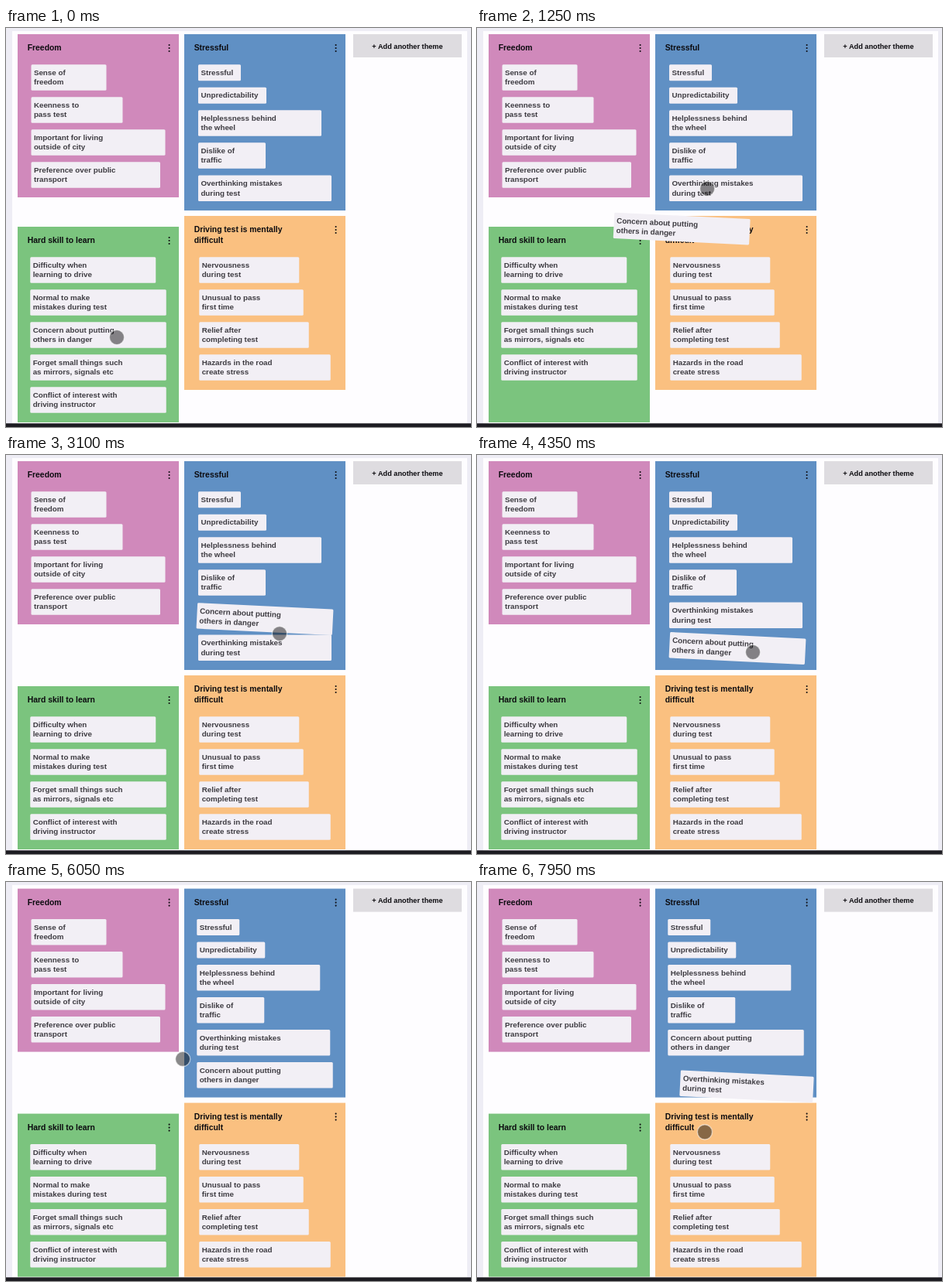
Animation, 600 px wide and 516 px high, one loop 8 s. Source, as an HTML page:

```html
<!DOCTYPE html>
<html lang="en">
<head>
<meta charset="utf-8">
<title>Theme board</title>
<style>
  html, body { margin: 0; width: 100%; height: 100%; overflow: hidden; background: #fefdff; }
  svg { display: block; width: 600px; height: 516px; }
  text { font: bold 9.8px "Liberation Sans", Arial, sans-serif; fill: #3e3c42; }
  .title { font-size: 10.4px; fill: #0c0b0f; }
  .button { font-size: 9.2px; fill: #0c0b0f; text-anchor: middle; }
</style>
</head>
<body>
<svg viewBox="0 0 600 516"></svg>
<script>
const LOOP = 8000;
const SLOT = 42;          // height of a two-line card plus its gap
const LAG = 100;          // dragged cards trail the pointer
const TILT = 2.8;
const CARD_H = 33.5;

const svg = document.querySelector('svg');

function add(parent, name, attrs = {}, text) {
  const node = document.createElementNS(svg.namespaceURI, name);
  for (const key in attrs) node.setAttribute(key, attrs[key]);
  if (text) node.textContent = text;
  parent.append(node);
  return node;
}
const rect = (parent, x, y, width, height, fill, rx = 0) =>
  add(parent, 'rect', { x, y, width, height, fill, rx });
const move = (node, x, y) => node.setAttribute('transform', `translate(${x} ${y})`);

function makeCard(parent, label, width) {
  const card = add(parent, 'g');
  const lines = label.split('|');
  rect(card, 0, 0, width, lines.length > 1 ? CARD_H : 21, '#f2eff5', 1.5);
  lines.forEach((line, i) => add(card, 'text', { x: 3.4, y: 13.7 + i * 12.5 }, line));
  return card;
}

function makeColumn(x, y, height, fill, title, cards) {
  const group = add(board, 'g');
  const box = rect(group, 0, 0, 208, height, fill);
  const lines = title.split('|');
  lines.forEach((line, i) =>
    add(group, 'text', { class: 'title', x: 12.7, y: 21.3 + i * 14 }, line));
  for (const cy of [14, 18, 22]) add(group, 'circle', { cx: 195.6, cy, r: 1.05, fill: '#0c0b0f' });

  // Cards share a left edge; the widest one is centred.
  const left = 104 - Math.max(...cards.map(c => c[1])) / 2;
  let top = 25.3 + 14 * lines.length;
  const items = cards.map(([label, width]) => {
    const item = { node: null, left, top };
    if (label) {
      item.node = makeCard(group, label, width);
      move(item.node, left, top);
    }
    top += !label || label.includes('|') ? SLOT : 29.5;
    return item;
  });
  move(group, x, y);
  return { group, box, items, x };
}

rect(svg, 0, 0, 600, 516, '#eeedf5');
rect(svg, 8, 4, 587, 512, '#fefdff');
const board = add(svg, 'g');

makeColumn(15, 8, 211, '#d089bb', 'Freedom', [
  ['Sense of|freedom', 97], ['Keenness to|pass test', 118],
  ['Important for living|outside of city', 173], ['Preference over public|transport', 166.5]]);
const blue = makeColumn(230, 8, 228, '#6090c4', 'Stressful', [
  ['Stressful', 55], ['Unpredictability', 88], ['Helplessness behind|the wheel', 159],
  ['Dislike of|traffic', 87], ['', 172]]);
const green = makeColumn(15, 257, 253, '#7bc47e', 'Hard skill to learn', [
  ['Difficulty when|learning to drive', 162], ['Normal to make|mistakes during test', 175.5],
  ['', 175.5], ['Forget small things such|as mirrors, signals etc', 175.5],
  ['Conflict of interest with|driving instructor', 175.5]]);
const orange = makeColumn(230, 243, 225, '#fac080', 'Driving test is mentally|difficult', [
  ['Nervousness|during test', 129], ['Unusual to pass|first time', 134.5],
  ['Relief after|completing test', 141.5], ['Hazards in the road|create stress', 169.5]]);

rect(board, 448, 8, 140, 30, '#dedce0');
add(board, 'text', { class: 'button', x: 518, y: 26.5 }, '+ Add another theme');

const dragLayer = add(board, 'g');
const overthinking = makeCard(dragLayer, 'Overthinking mistakes|during test', 172);
const concern = makeCard(dragLayer, 'Concern about putting|others in danger', 175.5);

rect(svg, 0, 511.3, 600, 5, '#1d1c22');
const pointer = add(svg, 'circle', {
  r: 9.6, fill: '#000', 'fill-opacity': 0.46, stroke: '#fff', 'stroke-opacity': 0.55, 'stroke-width': 1.4 });

// Pointer path: time, x, y
const PATH = [
  [0, 143, 400], [400, 143, 400], [650, 152, 392], [900, 210, 340], [1150, 284, 263],
  [1250, 297, 208], [1450, 325, 160], [1700, 345, 132], [2100, 345, 147], [2200, 345, 159],
  [2600, 349, 190], [3000, 354, 215], [3100, 353, 231], [3500, 356, 248], [4250, 356, 253],
  [4350, 356, 255], [4750, 357, 252], [5150, 345, 255], [5600, 140, 310], [6050, 228, 229],
  [6500, 272, 212], [7000, 284, 206], [7350, 284, 206], [7600, 293, 216], [7850, 300, 263],
  [7950, 294, 323], [8050, 285, 350]];

// Smooth interpolation that never overshoots a key position.
function along(t, axis) {
  let i = 0;
  while (i < PATH.length - 2 && t >= PATH[i + 1][0]) i++;
  const slope = k => PATH[k] && PATH[k + 1]
    ? (PATH[k + 1][axis] - PATH[k][axis]) / (PATH[k + 1][0] - PATH[k][0]) : 0;
  const tangent = (a, b) => a * b > 0 ? 2 * a * b / (a + b) : 0;
  const [t0, t1] = [PATH[i][0], PATH[i + 1][0]];
  const d = t1 - t0, u = (t - t0) / d;
  const from = PATH[i][axis], to = PATH[i + 1][axis];
  const m0 = tangent(slope(i - 1), slope(i)), m1 = tangent(slope(i), slope(i + 1));
  const s = u * u * (3 - 2 * u);
  return from + (to - from) * s + d * (m0 * u * (1 - u) ** 2 - m1 * u * u * (1 - u));
}

function ease(t, start, length = 200) {
  const u = Math.min(1, Math.max(0, (t - start) / length));
  return u * u * (3 - 2 * u);
}
const mix = (a, b, k) => a + (b - a) * k;

// Blends a card between its resting centre and the trailing pointer.
function placeDragged(card, width, rest, grip, amount, t) {
  const late = Math.max(0, t - LAG);
  const x = mix(rest[0], along(late, 1) - grip[0], amount);
  const y = mix(rest[1], along(late, 2) - grip[1], amount);
  card.setAttribute('transform',
    `translate(${x} ${y}) rotate(${TILT * amount}) translate(${-width / 2} ${-CARD_H / 2})`);
}

function render(t) {
  const dropped = t >= 5000;
  const nudge = dropped ? -1.75 : 0;
  const grow = SLOT * ease(t, 1450);
  const pushed = (down, up) => SLOT * (ease(t, down) - ease(t, up));

  move(board, 0, dropped ? 0.6 : 0);
  blue.box.setAttribute('height', 228 + grow);
  green.box.setAttribute('height', 253 - grow);
  move(green.group, green.x, 257 + grow);
  move(orange.group, orange.x, 243 + grow);

  const closeGap = SLOT * ease(t, 900);
  for (const item of green.items.slice(3)) move(item.node, item.left, item.top - closeGap);

  const offsets = [0, 0, pushed(1800, 2450), pushed(1650, 2700)];
  offsets.forEach((dy, i) => {
    const item = blue.items[i];
    move(item.node, item.left + nudge, item.top + dy);
  });

  const concernRest = t < 2500 ? [119, 397] : [334, 249.2 - SLOT * ease(t, 7650)];
  placeDragged(concern, 175.5, concernRest, [20, 3],
    ease(t, 400, 150) - ease(t, 4750, 250), t);
  placeDragged(overthinking, 172, [334 + nudge, 207.2 + pushed(1500, 3600)], [-48, -0.4],
    ease(t, 7350, 150), t);

  const front = dropped ? overthinking : concern;
  if (dragLayer.lastChild !== front) dragLayer.append(front);
  move(pointer, along(t, 1), along(t, 2));
}

const start = performance.now();
function tick() {
  render((performance.now() - start) % LOOP);
  requestAnimationFrame(tick);
}
tick();
</script>
</body>
</html>
```
